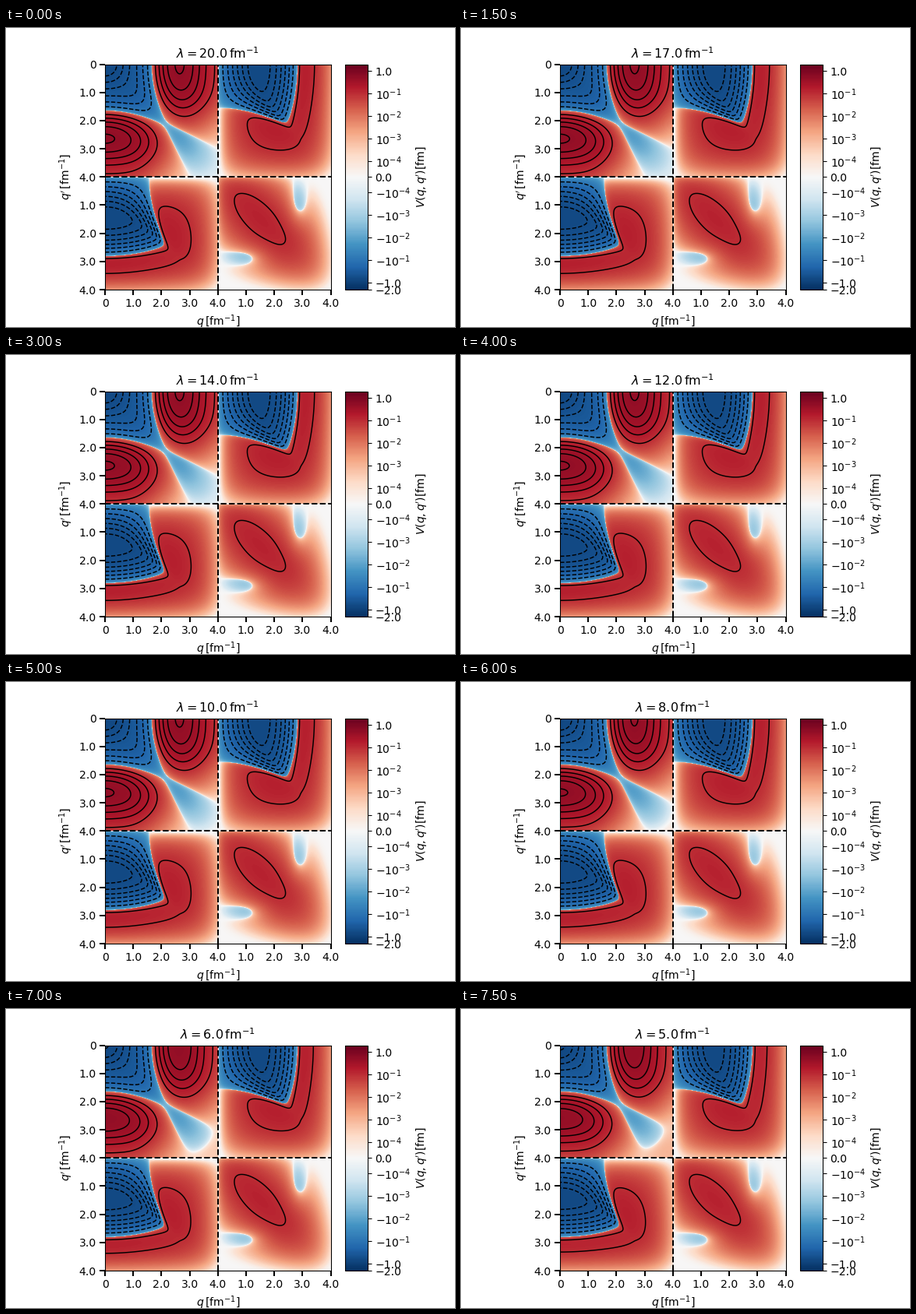
A matplotlib script for the animation above (8000 ms loop, 576 px wide and 384 px high).

```python
import numpy as np
import matplotlib.pyplot as plt
from matplotlib.animation import FuncAnimation
from matplotlib.colors import SymLogNorm

W, H, DPI = 576, 384, 96
QMAX, N = 4.0, 145
FRAMES, INTERVAL = 16, 500
LEVELS = [k / 10 for k in range(-8, 9) if k]

axis = np.linspace(0, QMAX, N)
Q, P = np.meshgrid(axis, axis)
Q2, P2 = Q**2, P**2
EDGE = np.exp(-((Q / 3.42) ** 9) - (P / 3.42) ** 9)


def s_wave():
    """Attractive core, two repulsive lobes and a weak diagonal tail."""
    sign = (Q2 - P2) ** 2 - 0.35 - 0.18 * (Q2 + P2 - 9) ** 2
    reach = (Q**9 + P**9) ** (1 / 9)
    r2 = Q2 + P2
    size = 0.0468 * np.exp(-((reach / 2.33) ** 3)) * (1 - 0.7 * r2 * np.exp(-r2))
    return sign * size / (1 + (Q * P / 6) ** 5)


def mixing():
    """Attractive well bounded by two soft edges, with a hook-shaped ridge outside."""
    a = 2.4 * (P2 - 2.45 - 0.38 * Q2)
    b = Q2 - 7.95 + 0.4 * P2
    z = (a + b + np.sqrt((a - b) ** 2 + 1.5)) / 2
    ridge = 3 * z / (1 + np.abs(z)) / (1 + P2 / 6) * Q2 / (Q2 + 0.3)
    return 0.1 * Q * np.exp(-0.09 * Q2) * np.where(z < 0, z, ridge) * EDGE


def d_wave():
    """Diagonal repulsive ridge with two shallow attractive pockets."""
    along, across = (Q + P - 3) / np.sqrt(2), (Q - P) / np.sqrt(2)
    ridge = 0.14 * np.exp(-((along / 2.38) ** 2) - (across / 0.86) ** 2)

    def pocket(x, y):
        return 1 - 1.3 * np.exp(-(((x - 2.92) / 0.49) ** 2) - (y / 1.68) ** 4)

    return (ridge * pocket(Q, P) * pocket(P, Q)
            * np.tanh(3 * Q) * np.tanh(3 * P) * EDGE)


ss, sd, dd = s_wave(), mixing(), d_wave()


def bump(center, height):
    return height * np.exp(-2 * ((Q - center) ** 2 + (P - center) ** 2))


def evolve(lam):
    """The four blocks after flowing down to resolution lam."""
    damp = np.exp(-(((Q2 - P2) / lam**2) ** 2))
    shift = (5 / lam) ** 4 * (bump(0, -0.02) + bump(3.7, 0.0012))
    mixed = sd * damp
    return [[ss * damp + shift, mixed], [mixed.T, dd * damp]]


def place(left, width):
    top, height = 46.55, 289.5
    return fig.add_axes([left / W, 1 - (top + height) / H, width / W, height / H])


plt.rcParams.update({"font.size": 10.5, "axes.titlesize": 12})
fig = plt.figure(figsize=(W / DPI, H / DPI), dpi=DPI, facecolor="white")
ax = place(127.05, 289.5)
cax = place(435.2, 29)

norm = SymLogNorm(linthresh=1e-4, linscale=1, vmin=-2, vmax=2, base=np.e)
im = ax.imshow(np.zeros((2 * N, 2 * N)), cmap="RdBu_r", norm=norm, aspect="auto",
               extent=(0, 8, 8, 0), interpolation="bilinear")
ax.autoscale(False)
ax.axhline(4, color="k", ls="--", lw=1.5)
ax.axvline(4, color="k", ls="--", lw=1.5)
names = ["0"] + [f"{k}.0" for k in (1, 2, 3, 4) * 2]
ax.set_xticks(range(9), names)
ax.set_yticks(range(9), names)
ax.tick_params(length=5, width=1.5)
ax.set_xlabel(r"$q \, [\mathrm{fm}^{-1}]$")
ax.set_ylabel(r"$q' \, [\mathrm{fm}^{-1}]$")
title = ax.set_title("")

bar = fig.colorbar(im, cax=cax)
powers = [-1, -2, -3, -4]
ticks = ([1] + [10.0**e for e in powers] + [0]
         + [-(10.0**e) for e in powers[::-1]] + [-1, -2])
labels = (["1.0"] + [f"$10^{{{e}}}$" for e in powers] + ["0.0"]
          + [f"$-10^{{{e}}}$" for e in powers[::-1]]
          + ["\N{MINUS SIGN}1.0", "\N{MINUS SIGN}2.0"])
bar.set_ticks(ticks, labels=labels)
bar.minorticks_off()
bar.set_label(r"$V(q, q') [\mathrm{fm}]$")

contours = []


def draw(i):
    lam = 20.0 - i
    blocks = evolve(lam)
    im.set_data(np.block(blocks))
    while contours:
        contours.pop().remove()
    for row in (0, 1):
        for col in (0, 1):
            contours.append(ax.contour(
                Q + QMAX * col, P + QMAX * row, blocks[row][col],
                levels=LEVELS, colors="k", linewidths=1.1))
    title.set_text(rf"$\lambda = {lam:.1f} \, \mathrm{{fm}}^{{-1}}$")
    return []


anim = FuncAnimation(fig, draw, frames=FRAMES, interval=INTERVAL,
                     init_func=lambda: draw(0), repeat=True, blit=False)
plt.show()
```
